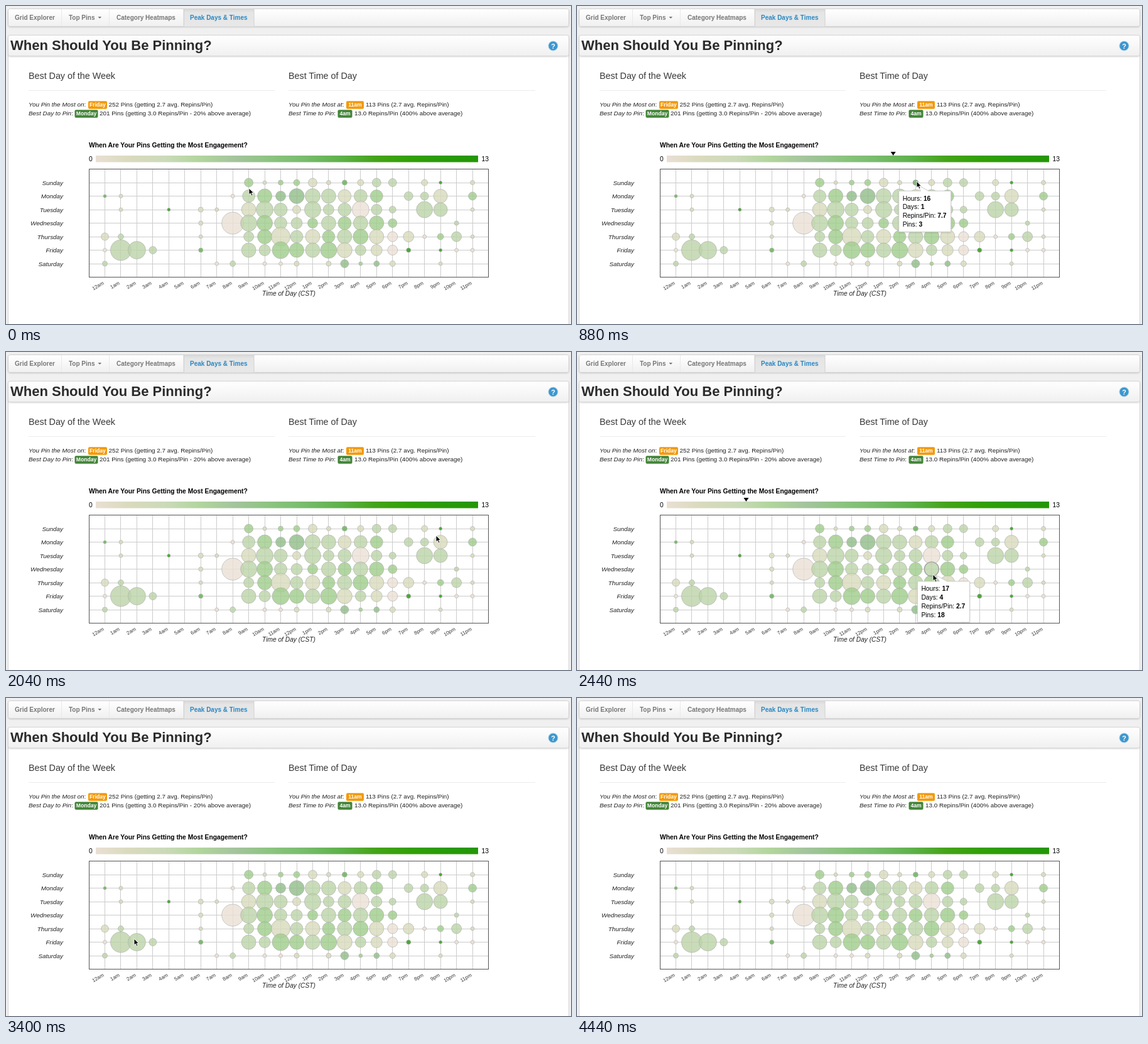
Write an HTML page that moves like this. It is 900 px wide and 506 px high and loops after 4480 ms.

```html
<!DOCTYPE html>
<html lang="en">
<head>
<meta charset="utf-8">
<style>
html, body { margin: 0; width: 100%; height: 100%; overflow: hidden; background: #f0f0f0; }
svg { display: block; width: 900px; height: 506px; font-family: "Liberation Sans", Arial, sans-serif; }
.b { font-weight: bold; }
.i { font-style: italic; }
</style>
</head>
<body>
<svg id="stage" viewBox="0 0 900 506">
  <defs>
    <linearGradient id="bar" x2="0" y2="1"><stop stop-color="#fff"/><stop offset="1" stop-color="#f0f0f0"/></linearGradient>
    <linearGradient id="tab" x2="0" y2="1"><stop stop-color="#d9d9d9"/><stop offset=".2" stop-color="#e5e5e5"/><stop offset="1" stop-color="#e8e8e8"/></linearGradient>
    <linearGradient id="scale"></linearGradient>
    <filter id="soft" x="-10%" y="-10%" width="120%" height="130%"><feDropShadow dx="0" dy="1" stdDeviation="1" flood-opacity=".16"/></filter>
  </defs>
  <g id="page"></g>
  <g id="chart"></g>
  <g id="hover"></g>
  <path id="cursor" d="M0 0V10.2L2.4 8L4.2 12L6 11.2L4.3 7.4H7.5Z" stroke="#fff" stroke-width=".9"/>
</svg>
<script>
const LOOP = 4480, STEP = 40;
const $ = id => document.getElementById(id);

const text = (x, y, size, str, cls = '', fill = '#222', more = '') =>
  `<text x="${x}" y="${y}" font-size="${size}" class="${cls}" fill="${fill}" ${more}>${str}</text>`;
const rect = (x, y, w, h, fill, more = '') =>
  `<rect x="${x}" y="${y}" width="${w}" height="${h}" fill="${fill}" ${more}/>`;
const line = (x1, y1, x2, y2, color) =>
  `<path d="M${x1} ${y1}L${x2} ${y2}" stroke="${color}"/>`;
const circle = (x, y, r, fill, more = '') =>
  `<circle cx="${x}" cy="${y}" r="${r}" fill="${fill}" ${more}/>`;
const END = 'text-anchor="end"', MID = 'text-anchor="middle"';

// Page header and summary
const badge = (x, y, w, color, str) =>
  rect(x, y - 9, w, 12.5, color, 'rx="2"') + text(x + w / 2, y, 8.6, str, 'b', '#fff', MID);

const summary = (x, y, label, bx, bw, color, value, tx, rest) =>
  text(x, y, 9.9, `${label}<tspan font-style="normal">:</tspan>`, 'i') +
  badge(bx, y, bw, color, value) + text(tx, y, 9.9, rest);

const ORANGE = '#f39a0a', GREEN = '#438539';
$('page').innerHTML =
  rect(3.5, 4.5, 893, 28, 'url(#bar)', 'rx="3" stroke="#d2d2d2" filter="url(#soft)"') +
  [88.5, 164.5, 282.5].map(x => line(x, 5, x, 32, '#e9e9e9')).join('') +
  rect(283, 5, 112, 27.5, 'url(#tab)') + line(283.5, 5, 283.5, 32, '#d0d0d0') + line(395, 5, 395, 32, '#d0d0d0') +
  text(14, 22, 10, 'Grid Explorer', 'b', '#777') +
  text(100, 22, 10, 'Top Pins', 'b', '#777') +
  '<path d="M146.5 17h5.6l-2.8 3z" fill="#777"/>' +
  text(176, 22, 10, 'Category Heatmaps', 'b', '#777') +
  text(293, 22, 10, 'Peak Days &amp; Times', 'b', '#2888c4') +
  rect(3.5, 46.5, 893, 480, '#fff', 'rx="3" stroke="#d6d6d6"') +
  rect(3.5, 46.5, 893, 33, 'url(#bar)', 'rx="3" stroke="#d6d6d6" filter="url(#soft)"') +
  text(7, 70, 22, 'When Should You Be Pinning?', 'b', '#2b2b2b') +
  circle(871.5, 63.5, 7.5, '#3c97cf', 'stroke="#a9cfe6"') +
  text(871.5, 67.5, 11, '?', 'b', '#fff', MID) +
  text(36, 115.5, 14.3, 'Best Day of the Week', '', '#383838') +
  text(450, 115.5, 14.3, 'Best Time of Day', '', '#383838') +
  line(36, 134.5, 428, 134.5, '#ececec') + line(450, 134.5, 843, 134.5, '#ececec') +
  summary(36, 160.3, 'You Pin the Most on', 131, 30, ORANGE, 'Friday', 163.5, '252 Pins (getting 2.7 avg. Repins/Pin)') +
  summary(36, 174.3, 'Best Day to Pin', 109.5, 37, GREEN, 'Monday', 149, '201 Pins (getting 3.0 Repins/Pin - 20% above average)') +
  summary(450, 160.3, 'You Pin the Most at', 542, 28, ORANGE, '11am', 573, '113 Pins (2.7 avg. Repins/Pin)') +
  summary(450, 174.3, 'Best Time to Pin', 528.5, 23, GREEN, '4am', 555, '13.0 Repins/Pin (400% above average)');

// Each day lists hour, radius and tone of its bubbles
const TONES = { a: '#ebe1d6', b: '#d8dabc', c: '#bdd4aa', d: '#a1cd8c', e: '#92bd8b', f: '#65b256', g: '#2b9a12' };
const DAYS = {
  Sunday: '9:7d 10:3b 11:4d 12:5d 13:7b 14:3.5b 15:4f 16:5b 17:7c 18:6.5c 20:5b 21:2.5g 23:3.5b',
  Monday: '0:2.5f 1:3b 8:3a 9:10c 10:11.5d 11:8e 12:12e 13:12c 14:11.5c 15:10.5b 16:10.5c 17:10d 19:7c 20:6.5c 21:11b 23:6.5d',
  Tuesday: '1:3b 4:2.5g 6:4b 7:3b 9:11.5b 10:13.5c 11:10.5c 12:6.5b 13:13c 14:8.5c 15:10.5c 16:13.5a 17:8.5c 18:5.5c 20:13c 21:11c 23:3b',
  Wednesday: '6:3.5b 8:17.5a 9:13c 10:12.5d 11:10c 12:9c 13:8d 14:11.5c 15:10.5d 16:11.5c 17:11.5d 18:7d 22:3.5c',
  Thursday: '0:6b 1:4.5c 6:3b 9:8c 10:11.5d 11:15b 12:10c 13:11.5b 14:10d 15:11.5c 16:12d 17:11.5b 18:8a 19:8.5b 20:3a 21:5d 22:8c 23:3b',
  Friday: '0:3a 1:16.5c 2:14c 3:6c 6:3.5f 9:11.5c 10:9c 11:13.5d 12:11.5d 13:11.5c 14:13d 15:12b 16:8.5c 17:9b 18:8a 19:3.5g 21:2.5g 22:3a 23:3a',
  Saturday: '0:4c 7:3a 8:4.5c 10:3a 11:3a 12:4b 14:4b 15:6.5e 16:3d 17:4.5e 18:4.5b 21:3b'
};
const hourX = h => 157.5 + 25.46 * h;
const dayY = d => 281 + 21.5 * d;
const scaleX = v => 143 + 609 * v / 13;

$('scale').innerHTML = ['#e9dfd3', '#d9dabd', '#cbdab9', '#b1d59c', '#a4c49d', '#8cc480', '#78bc6c', '#5fb24c', '#45a41a', '#32a005', '#289b08', '#249605']
  .map((c, i, all) => `<stop offset="${i / (all.length - 1)}" stop-color="${c}"/>`).join('');

let chart = text(132, 224.8, 10.3, 'When Are Your Pins Getting the Most Engagement?', 'b', '#000') +
  text(132, 247, 10.3, '0', '', '#000') + text(769, 247, 10.3, '13', '', '#000', END) +
  rect(143, 238, 609, 10.5, 'url(#scale)');
for (let h = 0; h < 24; h++) {
  const x = Math.round(hourX(h) - .5) + .5;
  chart += line(x, 260, x, 431, '#ccc') +
    text(0, 0, 8, `${h % 12 || 12}${h < 12 ? 'am' : 'pm'}`, '', '#333', `${END} transform="translate(${x - 1} 442.5) rotate(-30)"`);
}
Object.keys(DAYS).forEach((name, d) => {
  const y = Math.round(dayY(d) - .5) + .5;
  chart += line(132, y, 769, y, '#ccc') + text(91, y + 3, 9.9, name, 'i', '#222', END);
});
chart += rect(132.5, 259.5, 636, 172, 'none', 'stroke="#555"') +
  text(450.5, 461.3, 10.2, 'Time of Day (CST)', 'i', '#222', MID);

const radius = {};
Object.values(DAYS).forEach((list, d) => list.split(' ').forEach(item => {
  const [, h, r, tone] = item.match(/(\d+):([\d.]+)(\w)/);
  radius[[+h, d]] = +r;
  chart += circle(hourX(h), dayY(d), r, TONES[tone], 'fill-opacity=".82" stroke="#aaa" stroke-opacity=".75" stroke-width=".8"');
}));
$('chart').innerHTML = chart;

// Details shown while the pointer rests on a bubble
const TIPS = [
  { from: 800, to: 1040, hour: 15, day: 0, rate: 7.7, pins: 3 },
  { from: 2360, to: 2640, hour: 16, day: 3, rate: 2.7, pins: 18 },
  { from: 3440, to: 4000, hour: 2, day: 5, rate: 2.7, pins: 27 }
];
const tooltip = ({ hour, day, rate, pins }) => {
  const cx = hourX(hour), cy = dayY(day), r = radius[[hour, day]];
  const x = cx + r * .57, y = cy + r * .82, left = x - 29, mx = scaleX(rate);
  const rows = [['Hours', hour + 1], ['Days', day + 1], ['Repins/Pin', rate], ['Pins', pins]];
  return `<path d="M${mx - 4} 232h8l-4 6z"/>` +
    circle(cx, cy, r, 'none', 'stroke="#9a9a9a" stroke-width="1.2"') +
    `<path d="M${x} ${y}L${x + 18} ${y + 10}H${left + 83}V${y + 75}H${left}V${y + 10}H${x + 6}Z" fill="#fff" stroke="#ccc" filter="url(#soft)"/>` +
    rows.map(([k, v], i) => text(left + 6, y + 25.3 + 13.9 * i, 10.3, `${k}: <tspan class="b">${v}</tspan>`, '', '#000')).join('');
};

// Pointer stops: time, x, y
const PATH = [[0, 387, 290], [800, 541, 279], [1040, 541, 279], [1360, 570, 273], [2040, 685, 292],
  [2360, 567, 354], [2640, 567, 354], [3400, 204, 383], [4080, 204, 383]];
const pointer = t => {
  const i = PATH.findIndex(p => p[0] > t);
  if (i < 0) return null;
  const [a, b] = [PATH[i - 1], PATH[i]];
  const k = (t - a[0]) / (b[0] - a[0]), ease = k * k * (3 - 2 * k);
  return [1, 2].map(n => a[n] + (b[n] - a[n]) * ease);
};

let shown;
function draw(now) {
  const t = Math.floor(now % LOOP / STEP) * STEP;
  const tip = TIPS.find(p => t >= p.from && t < p.to);
  if (tip !== shown) $('hover').innerHTML = tip ? tooltip(tip) : '';
  shown = tip;
  const at = pointer(t);
  $('cursor').style.display = at ? '' : 'none';
  if (at) $('cursor').setAttribute('transform', `translate(${at})`);
  requestAnimationFrame(draw);
}
draw(0);
</script>
</body>
</html>
```
